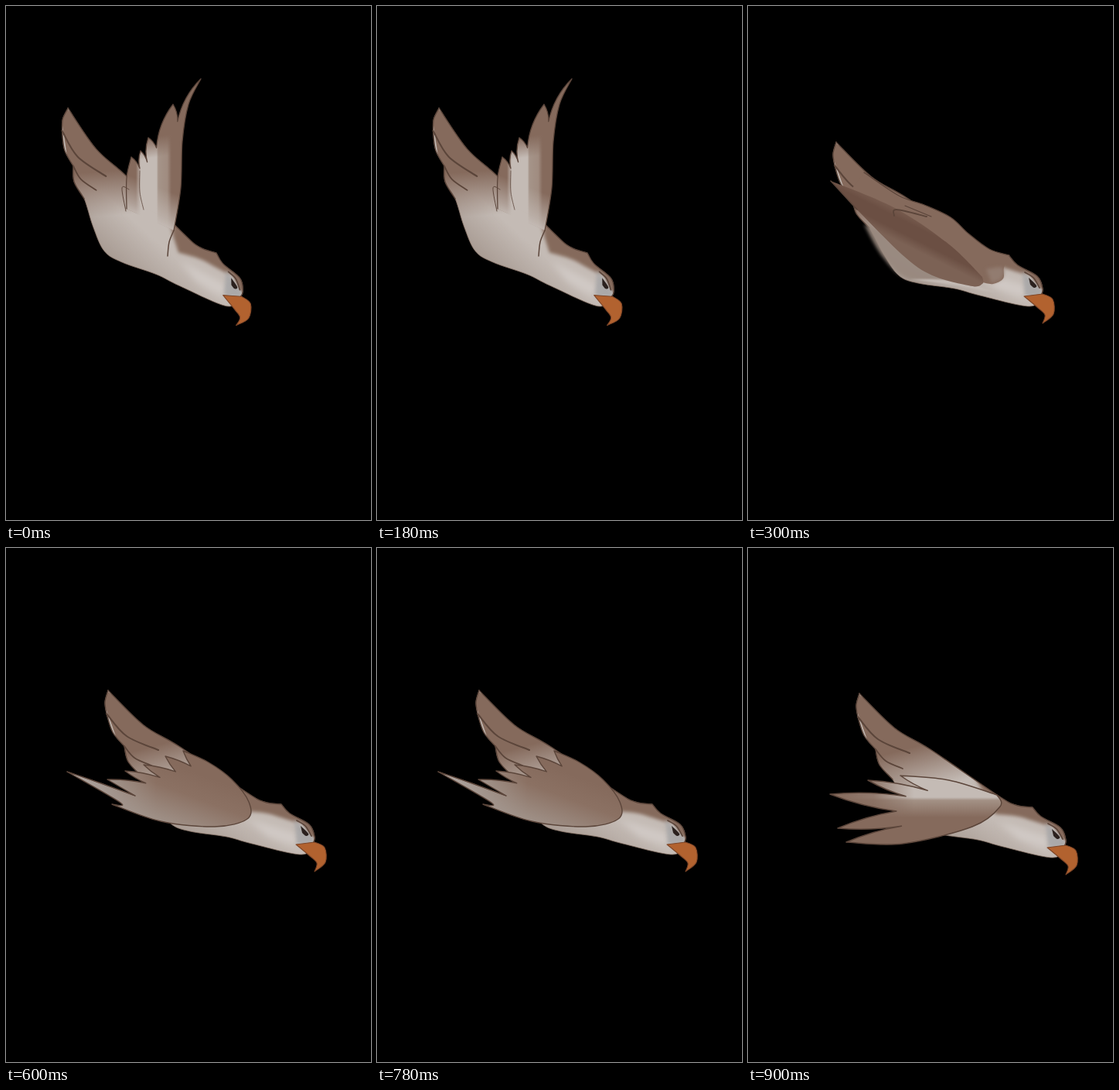
Write an HTML page that moves like this. It is 472x664 px and loops after 1.2 s.

```html
<!DOCTYPE html>
<html lang="en">
<head>
<meta charset="utf-8">
<title>Diving bird</title>
<style>
  html, body { margin: 0; width: 100%; height: 100%; overflow: hidden; background: #000; }
  svg { display: block; width: 100vw; height: 100vh; }
</style>
</head>
<body>
<svg id="stage" viewBox="0 0 472 664"></svg>
<script>
const BROWN = '#856a5c', DARK = '#6b4f43', LIGHT = '#c4bbb5', PALE = '#d0c9c5',
  GREY = '#a09289', LINE = '#5b453a', BEAK = '#b2622f';
const HOLD = 300;
const defs = [];

// Smooth curve through key points; "|" marks a sharp corner.
function spline(text) {
  let last = null, d = '';
  for (const part of text.split('|')) {
    const p = part.trim().split(/\s+/).map(s => s.split(',').map(Number));
    if (last) p.unshift(last); else d = `M${p[0]}`;
    for (let i = 0; i < p.length - 1; i++) {
      const a = p[i - 1] || p[i], b = p[i], c = p[i + 1], e = p[i + 2] || c;
      const near = (m, from, to) => m.map((v, k) => v + (to[k] - from[k]) / 6);
      d += `C${near(b, a, c)} ${near(c, e, b)} ${c}`;
    }
    last = p[p.length - 1];
  }
  return d;
}
const onward = text => spline(text).replace('M', 'L');

const mix = (a, b, t) => a.map((v, k) => v + (b[k] - v) * t);

// Feather tips joined by notches that are pulled towards the root of the wing.
function fan(tips, root, { depth, bias = .5, bulge = .06 }) {
  const bow = (a, b) => {
    const [x, y] = mix(a, b, .5);
    return `Q${x + (b[1] - a[1]) * bulge},${y - (b[0] - a[0]) * bulge} ${b}`;
  };
  return tips.slice(1).map((tip, i) => {
    const notch = mix(mix(tips[i], tip, bias), root, depth);
    return bow(tips[i], notch) + bow(notch, tip);
  }).join('');
}

// Linear gradient between two points; stops are [offset, colour, alpha].
function grad([x1, y1], [x2, y2], ...stops) {
  const id = `g${defs.length}`;
  defs.push(`<linearGradient id="${id}" gradientUnits="userSpaceOnUse" x1="${x1}" y1="${y1}" x2="${x2}" y2="${y2}">` +
    stops.map(([at, c, a = 1]) => `<stop offset="${at}" stop-color="${c}" stop-opacity="${a}"/>`).join('') +
    '</linearGradient>');
  return `url(#${id})`;
}

function clipped(d, inside) {
  const id = `c${defs.length}`;
  defs.push(`<clipPath id="${id}"><path d="${d}"/></clipPath>`);
  return `<g clip-path="url(#${id})">${inside}</g>`;
}

for (const r of [1, 2, 4])
  defs.push(`<filter id="b${r}" x="-50%" y="-50%" width="200%" height="200%"><feGaussianBlur stdDeviation="${r}"/></filter>`);

const stroke = (d, w = 1.5, color = LINE) => `<path d="${d}" fill="none" stroke="${color}" stroke-width="${w}"/>`;
const line = (points, w) => stroke(spline(points), w);
const layers = (d, ...paints) => paints.map(p => `<path d="${d}" fill="${p}"/>`).join('');
const soft = (points, color, blur = 2, alpha = 1) =>
  `<path d="${spline(points)}" fill="${color}" filter="url(#b${blur})" opacity="${alpha}"/>`;

// Far wing, trunk and head, the same in every pose.
function bird() {
  const back = '144,188 190,233 237,261 322,319 346,332 368,335 | 379,347 404,361 411,377 409,386';
  const wing = '187,299 170,280 165,260 | 150,242 142,218 | 140,203 144,188';
  const outline = spline(`${back} | 394,400 330,386 297,377 250,370 225,360 205,332 ${wing}`);
  const beak = spline('387,387 411,384 | 424,391 425,410 411,422 | 414,411 405,402 387,387');
  const fade = grad([195, 262], [210, 318], [0, BROWN], [1, BROWN, 0]);
  return layers(outline, LIGHT)
    + clipped(outline,
      layers(outline, grad([235, 370], [265, 320], [0, GREY, .8], [1, GREY, 0]))
      + layers(spline('130,180 237,255 340,325 | 260,330 180,320'), fade)
      + soft('290,290 340,322 370,330 410,355 | 388,358 350,347 320,344', BROWN)
      + soft('325,354 389,373 | 387,388 350,376', PALE, 4)
      + soft('385,355 408,376 408,386 388,387', '#a4a4a6', 2, .8)
      + soft('376,340 412,355 | 411,378 392,356', BROWN, 1))
    + stroke(outline, .8, '#806c60') + stroke(spline(`${back} | 409,386`), 1.4)
    + line(wing, 1.4) + line('142,218 168,247 209,265', 2.1) + line('165,260 178,275 200,285', 1.8)
    + line('388,356 399,363 407,376', 1.8)
    + layers(spline('393,363 403,373 400,376 395,372'), '#2b211e')
    + layers(beak, BEAK) + stroke(beak, 1.1, '#7d4527');
}

// Near wing of each pose.
function raised() {
  const tips = [[162, 195], [174, 187], [184, 170], [216, 127], [252, 94]];
  const wing = spline('156,262 156,222 162,195')
    + fan(tips, [215, 290], { depth: .17, bias: .2, bulge: .15 })
    + onward('252,94 236,127 228,175 226,235 217,290');
  const stripes = grad([168, 0], [214, 0],
    [0, BROWN], [.14, LIGHT], [.58, LIGHT], [.63, '#a59489'], [.88, '#a08c80'], [1, BROWN]);
  return layers(wing, stripes,
      grad([186, 170], [190, 196], [0, BROWN], [1, BROWN, 0]),
      grad([200, 235], [182, 280], [0, LIGHT, 0], [1, LIGHT]))
    + soft('156,262 217,290 | 190,300', LIGHT, 4)
    + stroke(wing, 1.3) + line('217,290 211,305 209,323')
    + line('159,237 150,235 155,265', 1) + line('173,213 173,240 178,263', .8);
}

function folded() {
  const top = '150,215 195,245 228,257 262,273 285,294 312,314 338,322';
  const wing = spline('107,226 190,261 260,308 303,350 | 303,359 285,361 220,338 141,263 | 107,226');
  return soft('150,282 175,325 208,353 270,356 | 200,300', '#97877d', 2, .9)
    + soft('208,353 270,355 320,370 | 270,361', LIGHT, 1)
    + layers(spline(`${top} | 331,338 330,352 317,359 303,357 | 220,335 141,263 | 135,235`), BROWN)
    + soft('308,340 329,338 328,352 315,358', '#927c70')
    + layers(wing, grad([190, 302], [212, 258], [0, '#7c6255'], [.25, DARK], [.55, DARK], [1, BROWN]))
    + line(top, 1.3) + line('107,226 141,263')
    + line('189,271 192,263 231,272', 1.8) + line('203,258 237,272', 1.2);
}

function spread() {
  const tips = [[131, 299], [154, 288], [178, 280], [206, 269], [229, 262]];
  const wing = spline('229,262 262,277 292,299 314,328 312,350 270,360 200,353 137,331 | 148,329 79,289 | 120,303 167,320 | 131,299')
    + fan(tips, [316, 340], { depth: .22 });
  return layers(wing, grad([232, 285], [205, 357], [0, BROWN], [.4, '#8b7163'], [1, GREY]),
      grad([80, 0], [195, 0], [0, '#b5aba6'], [.4, '#a89d97', .8], [1, GREY, 0]))
    + stroke(wing, 1.4) + line('79,289 120,303 167,320', 1);
}

function swept() {
  const tips = [[127, 380], [116, 362], [106, 318], [155, 300], [197, 294]];
  const wing = spline('197,294 260,300 322,319 | 326,334 290,360 200,382 127,380')
    + fan(tips, [324, 340], { depth: .38 });
  return layers(wing, grad([0, 322], [0, 348], [0, LIGHT], [.15, '#a39185'], [1, BROWN]),
      grad([110, 0], [215, 0], [0, BROWN], [.5, BROWN, .8], [1, BROWN, 0]))
    + stroke(wing, 1.5);
}

// Where the body sits, and which wing it beats.
const poses = [
  ['translate(272 319) rotate(11) translate(-368 -335)', raised],
  ['translate(-30 -12)', folded],
  ['translate(-12 -4)', spread],
  ['translate(0 0)', swept],
];
const body = bird();
const drawn = poses.map(([move, wing]) => `<g class="pose"><g transform="${move}">${body}</g>${wing()}</g>`);
const stage = document.getElementById('stage');
stage.innerHTML = `<defs>${defs.join('')}</defs><rect width="472" height="664"/>
  <g stroke-linejoin="round" stroke-linecap="round">${drawn.join('')}</g>`;

const groups = [...stage.querySelectorAll('.pose')];
function show(time) {
  const active = Math.floor(time / HOLD) % groups.length;
  groups.forEach((g, i) => { g.style.display = i === active ? '' : 'none'; });
}
let start;
function tick(now) {
  start ??= now;
  show(now - start);
  requestAnimationFrame(tick);
}
show(0);
requestAnimationFrame(tick);
</script>
</body>
</html>
```
